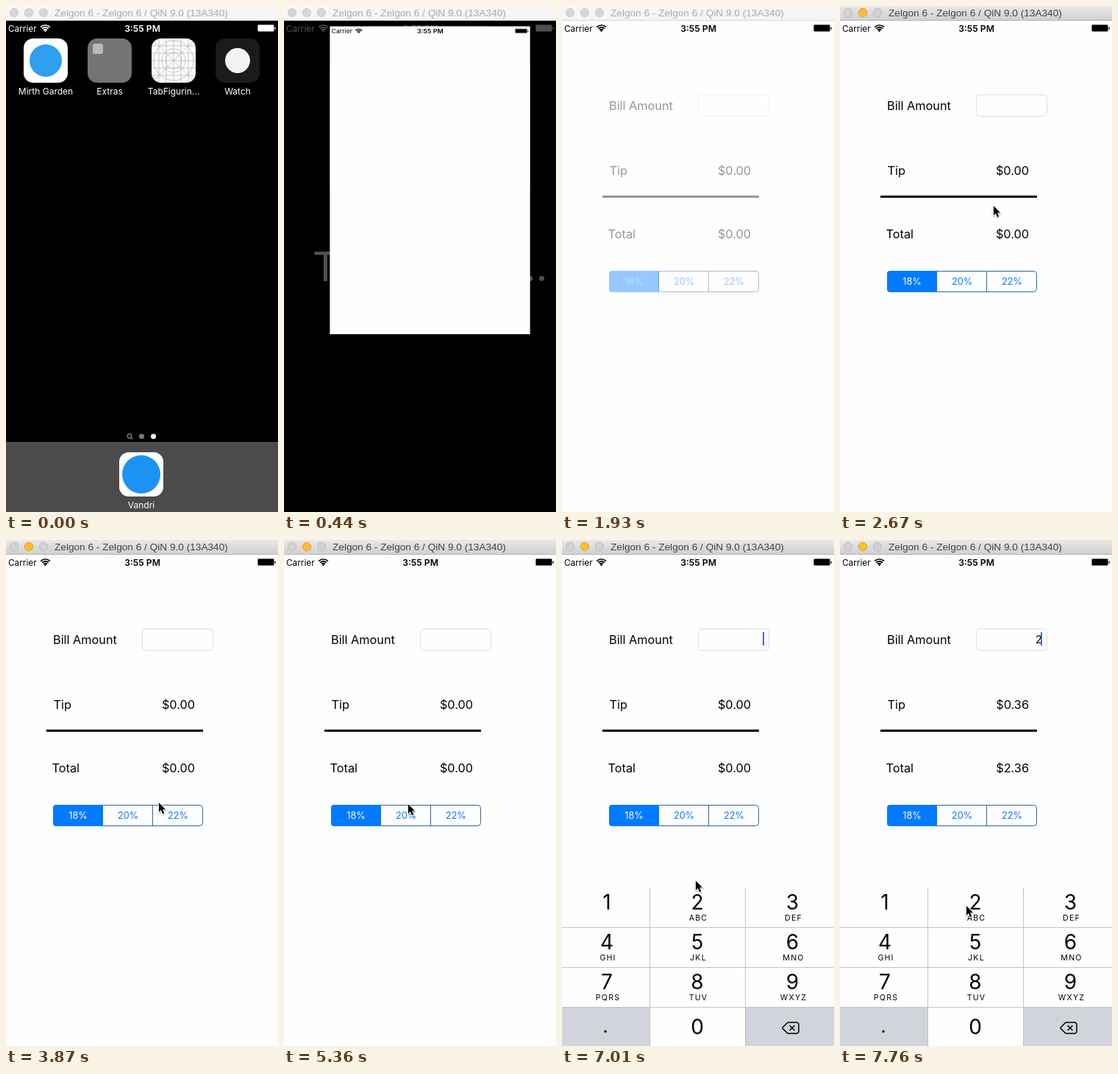
An HTML page with a canvas for the animation above (8000 ms loop, 370 px wide and 686 px high).

```html
<!DOCTYPE html>
<html lang="en">
<head>
<meta charset="utf-8">
<title>Tip calculator demo</title>
<style>
html, body { margin: 0; width: 100%; height: 100%; overflow: hidden; background: #fefefe; }
canvas { display: block; width: 370px; height: 686px; }
</style>
</head>
<body>
<canvas id="stage" width="370" height="686"></canvas>
<script>
const ctx = document.getElementById('stage').getContext('2d');
const W = 370, H = 686, LOOP = 8000, LAST = 52;
const UI = 'Inter, "Open Sans", sans-serif';
const BLUE = '#007aff', PAPER = '#fefefe';

const SHORT = [3, 10, 17, 35];
const startOf = k => 150 * k - 10 * SHORT.filter(s => k >= s).length;
function tickAt(t) {
  let k = 0;
  while (k < LAST && startOf(k + 1) <= t) k++;
  return k;
}

const mix = (a, b, p) => a + (b - a) * p;
const spring = u => 1 - (1 + u) * Math.exp(-u);

// Pointer path: tick, x, y
const PATH = [
  [14, 140, 616], [15, 143, 611], [16, 143, 611], [17, 185, 420], [18, 208, 270],
  [22, 208, 270], [24, 216, 335], [26, 207, 355], [29, 172, 366], [30, 168, 365],
  [31, 168, 365], [33, 178, 435], [34, 177, 418], [36, 168, 357], [38, 236, 168],
  [39, 250, 130], [40, 252, 128], [43, 252, 128], [46, 190, 430], [48, 172, 492], [49, 171, 495]
];

function rect(x, y, w, h, color) {
  ctx.fillStyle = color;
  ctx.fillRect(x, y, w, h);
}
function round(x, y, w, h, r, fill, stroke) {
  ctx.beginPath();
  ctx.roundRect(x, y, w, h, r);
  if (fill) { ctx.fillStyle = fill; ctx.fill(); }
  if (stroke) { ctx.strokeStyle = stroke; ctx.lineWidth = 1; ctx.stroke(); }
}
function disc(x, y, r, fill, stroke) {
  ctx.beginPath();
  ctx.arc(x, y, r, 0, 7);
  if (fill) { ctx.fillStyle = fill; ctx.fill(); }
  if (stroke) { ctx.strokeStyle = stroke; ctx.stroke(); }
}
function line(color, width, ...pts) {
  ctx.beginPath();
  pts.forEach(([x, y]) => ctx.lineTo(x, y));
  ctx.strokeStyle = color;
  ctx.lineWidth = width;
  ctx.stroke();
}
function text(s, x, y, size, color, align = 'left', weight = 400, family = UI) {
  ctx.font = `${weight} ${size}px ${family}`;
  ctx.textAlign = align;
  ctx.fillStyle = color;
  ctx.fillText(s, x, y);
}

function titleBar(active) {
  const g = ctx.createLinearGradient(0, 0, 0, 20);
  g.addColorStop(0, active ? '#e9e8e9' : '#f7f7f7');
  g.addColorStop(1, active ? '#d0cfd0' : '#f4f4f4');
  rect(0, 0, W, 20, g);
  rect(0, 19, W, 1, active ? '#b4b4b4' : '#d6d6d6');
  ctx.lineWidth = 1;
  [11, 31, 51].forEach((x, i) => {
    const lit = active && i === 1;
    disc(x, 9, 5.7, lit ? '#fdbd2f' : active ? '#d3d2d3' : '#d6d6d6',
      lit ? '#e0a32c' : active ? '#bdbcbd' : '#cdcdcd');
  });
  text('Zelgon 6 - Zelgon 6 / QiN 9.0 (13A340)', 66, 14, 13.65,
    active ? '#444' : '#a9a9a9', 'left', 400, '"Liberation Sans", Arial, sans-serif');
}

function statusBar(color) {
  text('Carrier', 3, 34.5, 11.8, color);
  text('3:55 PM', 185.5, 34.5, 12.2, color, 'center', 600);
  ctx.strokeStyle = color;
  ctx.lineWidth = 1.7;
  [3.4, 6.2, 9].forEach(r => {
    ctx.beginPath();
    ctx.arc(53.5, 35, r, -Math.PI * .75, -Math.PI * .25);
    ctx.stroke();
  });
  disc(53.5, 33.6, 1.3, color);
  round(342.5, 25.5, 22, 9, 1.5, null, color + '8');
  rect(343, 26, 21, 8, color);
  rect(365.5, 28.8, 1.3, 3, color);
}

function gridIcon(x, y) {
  const c = '#b0b0b0', cx = x + 30, cy = y + 30;
  round(x, y, 60, 60, 13, '#fbfbfb');
  ctx.save();
  ctx.clip();
  for (const d of [-20, -10, 0, 10, 20]) {
    line(c, .7, [cx + d, y], [cx + d, y + 60]);
    line(c, .7, [x, cy + d], [x + 60, cy + d]);
  }
  line(c, .7, [x, y], [x + 60, y + 60]);
  line(c, .7, [x + 60, y], [x, y + 60]);
  [11, 16, 27].forEach(r => disc(cx, cy, r, null, c));
  ctx.restore();
}

function home() {
  round(24, 44, 60, 60, 13, '#fff');
  disc(54, 74, 22, '#2f9ff0');
  round(111, 44, 60, 60, 13, '#747474');
  round(118, 51, 14, 14, 3, '#b9b9b9');
  gridIcon(198, 44);
  round(285, 44, 60, 60, 13, '#1b1b1b');
  disc(315, 74, 17, '#f2f2f2');
  ['Mirth Garden', 'Extras', 'TabFigurin...', 'Watch'].forEach((s, i) =>
    text(s, 54 + 87 * i, 120, 12, '#fff', 'center'));

  ctx.lineWidth = 1.5;
  disc(168, 583, 2.7, null, '#777');
  line('#777', 1.5, [170, 585], [172.5, 587.5]);
  disc(184.5, 583.5, 3.5, '#777');
  disc(200.5, 583.5, 3.5, '#fff');

  rect(0, 591, W, 95, '#4b4b4b');
  round(154, 605, 60, 60, 13, '#fff');
  disc(184, 635, 26, '#1c93f3');
  text('Vandri', 184, 681, 12, '#fff', 'center');
}

// App window grows out of its icon while the home screen zooms and fades.
function launch(k) {
  const u = .87 + 1.5 * (k - 2), done = k >= 8;
  const p = done ? 1 : k < 2 ? 0 : spring(u);
  const q = done ? 1 : k < 2 ? 0 : spring(u - .4);
  const x = mix(198, 0, p), w = mix(258, W, p) - x;
  const y = mix(44, 20, p), h = mix(104, H, q) - y;
  const zoom = w / 60;

  rect(0, 0, W, H, '#000');
  ctx.save();
  ctx.globalAlpha = 1 - p;
  statusBar('#fff');
  ctx.translate(x, y);
  ctx.scale(zoom, zoom);
  ctx.translate(-198, -44);
  home();
  ctx.restore();
  if (!p) return;

  ctx.save();
  ctx.globalAlpha = Math.min(1, p * 1.5);
  ctx.translate(x, y);
  ctx.scale(w / W, h / (H - 20));
  ctx.translate(0, -20);
  rect(0, 20, W, H - 20, PAPER);
  statusBar('#000');
  ctx.restore();
}

function form(tip, total) {
  const size = 16.3;
  text('Bill Amount', 64, 141, size, '#000');
  text('Tip', 64.5, 229, size, '#000');
  text('Total', 62.5, 315, size, '#000');
  text(tip, 257, 229, size, '#000', 'right');
  text(total, 257, 315, size, '#000', 'right');
  round(185.5, 120.5, 96, 29, 4, null, '#dedede');
  rect(55, 257, 213, 3, '#000');

  const edge = '#30639a';
  round(131.5, 359.5, 136, 28, [0, 4, 4, 0], null, edge);
  rect(199, 360, 1, 27, edge);
  round(64, 359, 68, 29, [4, 0, 0, 4], BLUE);
  ['18%', '20%', '22%'].forEach((s, i) =>
    text(s, 98 + 68 * i, 378, 12.7, i ? BLUE : '#fff', 'center'));
}

function keypad(dy, pressed) {
  const cols = [61, 184, 313.5], top = 471;
  const letters = ['', 'ABC', 'DEF', 'GHI', 'JKL', 'MNO', 'PQRS', 'TUV', 'WXYZ'];
  const grey = '#d1d5db', rule = '#c3c3c6';
  ctx.save();
  ctx.translate(0, dy);
  rect(0, top, W, 216, PAPER);
  if (pressed) rect(120, top, 129, 54, grey);
  rect(0, 633, 119, 54, grey);
  rect(250, 633, 120, 54, grey);
  rect(119, top, 1, 216, rule);
  rect(249, top, 1, 216, rule);
  for (let i = 1; i < 4; i++) rect(0, top + 54 * i, W, 1, rule);

  letters.forEach((s, i) => {
    const x = cols[i % 3], y = 54 * Math.floor(i / 3);
    text(i + 1, x, 501 + y, 28, '#000', 'center');
    ctx.letterSpacing = '1.2px';
    text(s, x + 1.5, 516 + y, 10.6, '#000', 'center');
    ctx.letterSpacing = '0px';
  });
  text('0', 184, 670, 28, '#000', 'center');
  text('.', 59, 668, 26, '#000', 'center');

  ctx.lineJoin = 'round';
  line('#000', 1.5, [299.5, 661.5], [307, 654], [320, 654], [322, 656],
    [322, 667], [320, 669], [307, 669], [299.5, 661.5]);
  line('#000', 1.5, [309.5, 658], [316.5, 665]);
  line('#000', 1.5, [316.5, 658], [309.5, 665]);
  ctx.restore();
}

function pointer(k) {
  if (k < PATH[0][0]) return;
  let i = 0;
  while (i < PATH.length - 2 && PATH[i + 1][0] <= k) i++;
  const [ka, xa, ya] = PATH[i], [kb, xb, yb] = PATH[i + 1];
  const p = Math.min(1, (k - ka) / (kb - ka));
  ctx.save();
  ctx.translate(mix(xa, xb, p) + .9, mix(ya, yb, p) + 1);
  ctx.scale(.92, .92);
  ctx.beginPath();
  [[0, 0], [0, 14], [3.2, 11], [5.6, 16.5], [8, 15.5], [5.6, 10], [10, 10]]
    .forEach(([x, y]) => ctx.lineTo(x, y));
  ctx.closePath();
  ctx.shadowColor = 'rgba(0,0,0,.35)';
  ctx.shadowBlur = 2;
  ctx.shadowOffsetY = 1;
  ctx.lineWidth = 2;
  ctx.strokeStyle = '#fff';
  ctx.stroke();
  ctx.shadowColor = 'transparent';
  ctx.fillStyle = '#000';
  ctx.fill();
  ctx.restore();
}

function app(k) {
  const typed = k >= 50;
  rect(0, 0, W, H, PAPER);
  statusBar('#000');
  ctx.globalAlpha = Math.min(1, .41 + .43 * (k - 13));
  form(typed ? '$0.36' : '$0.00', typed ? '$2.36' : '$0.00');
  ctx.globalAlpha = 1;
  if (typed) text('2', 274.5, 140, 14, '#000', 'right');
  if (k >= 39) rect(273, 125, 2, 18, '#4169d8');
  if (k >= 42) {
    const up = k >= 47 ? 1 : spring(3.54 + 1.5 * (k - 43));
    keypad(216 * (1 - up), k === 49);
  }
  pointer(k);
}

function draw(t) {
  const k = tickAt(t);
  if (k < 13) launch(k); else app(k);
  titleBar(k >= 14);
}

function loop() {
  draw(performance.now() % LOOP);
  requestAnimationFrame(loop);
}
loop();
</script>
</body>
</html>
```
